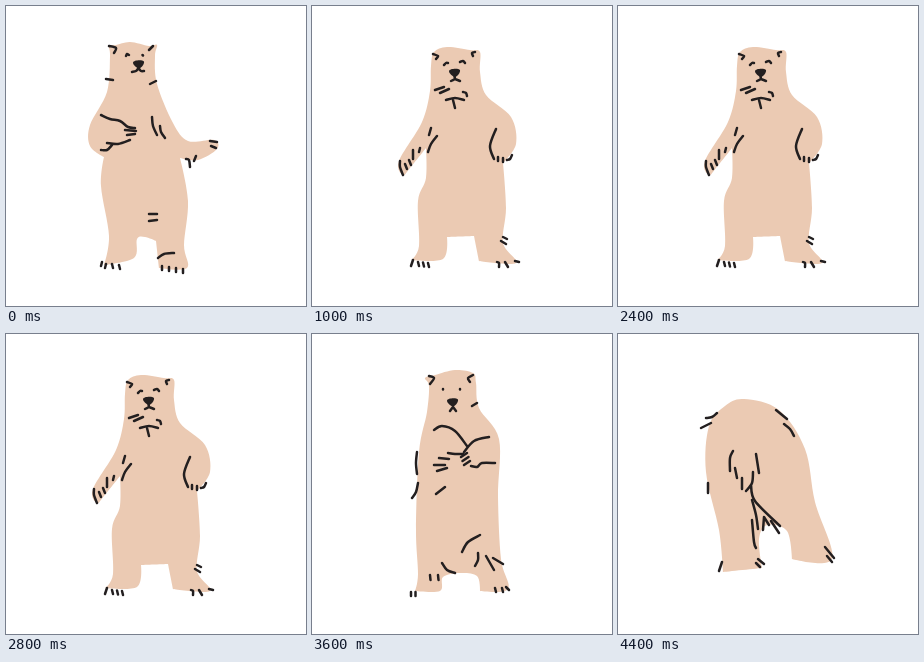
An HTML page that plays this animation: 300 px wide and 300 px high, repeating every 4.6 s.

```html
<!DOCTYPE html>
<html lang="en">
<head>
<meta charset="utf-8">
<title>Dancing bear</title>
<style>
html, body { margin: 0; width: 100%; height: 100%; overflow: hidden; background: #fff; }
svg { display: block; width: 100%; height: 100%; }
.body { fill: #ebcab3; }
.ink { fill: none; stroke: #231f20; stroke-width: 2.5; stroke-linecap: round; stroke-linejoin: round; }
.nose { fill: #231f20; }
</style>
</head>
<body>
<svg id="stage" viewBox="0 0 300 300"></svg>
<script>
const stage = document.getElementById('stage');
let layer;

function add(parent, tag, attributes) {
  const node = document.createElementNS('http://www.w3.org/2000/svg', tag);
  for (const key in attributes) node.setAttribute(key, attributes[key]);
  return parent.appendChild(node);
}

// Smooth curve through "x,y" points; "!" marks a corner.
function spline(text, closed) {
  const words = text.split(' ');
  const points = words.map(word => word.replace('!', '').split(',').map(Number));
  const n = points.length;
  const at = i => points[closed ? (i + n) % n : Math.max(0, Math.min(n - 1, i))];
  const slope = (i, k) => words[(i + n) % n].endsWith('!') ? 0 : (at(i + 1)[k] - at(i - 1)[k]) / 6;
  let d = 'M' + points[0];
  for (let i = 0; i < n - !closed; i++) {
    const out = at(i).map((v, k) => v + slope(i, k));
    const into = at(i + 1).map((v, k) => v - slope(i + 1, k));
    d += `C${out} ${into} ${at(i + 1)}`;
  }
  return d + (closed ? 'Z' : '');
}

const body = points => add(layer, 'path', { class: 'body', d: spline(points, true) });
const ink = strokes => add(layer, 'path', { class: 'ink', d: strokes.split('|').map(s => spline(s)).join('') });
const nose = (x, y) => add(layer, 'path', {
  class: 'nose', transform: `translate(${x} ${y})`,
  d: 'M-5.5-1.5C-5-4 4-4.5 5.5-2.5C6 0 3 4 .5 4.5C-2 4-5.5 1-5.5-1.5Z'
});
function claws(count, x, y, stepX, stepY, dx = 1, dy = 4) {
  for (let i = 0; i < count; i++) {
    const px = x + i * stepX, py = y + i * stepY;
    ink(`${px},${py} ${px + dx},${py + dy}`);
  }
}

const poses = {
  armOut() {
    body('103,40 110,39 124,36 143,40 151,39 149,50 151,78 167,117 182,135 208,134 211,143 192,154 174,152! 182,195 178,239 181,262 153,262! 150,235! 139,231 131,233 128,252 98,259! 103,230 95,180 98,151! 84,140 84,119 101,86 104,50');
    nose(132.5, 58);
    ink('103,40 110,42 108,47|147,40 143,44|120,50 121,48 123,49|136.5,49 137,49.5');
    ink('126,66 130,65 132.5,62! 135,65 138,65|100,73 107,74|144,78 150,75');
    ink('95,109 104,113 114,115 122,121 129,122|119,124 130,125|121,129 129,128|95,144 101,144 106,139|101,137 112,138 124,134');
    ink('146,111 147,120 151,129|154,120 155,126 159,132|204,135 211,136|205,140 210,142');
    ink('180,153 183,154 184,161|190,150 188,155|143,208 151,208|143,215 151,214|152,252 158,248 168,247');
    claws(2, 96, 256, 4, 2, -1);
    claws(2, 106, 258, 7, 1);
    claws(4, 156, 260, 7, 1, 0);
  },
  forward() {
    body('122,46 135,41 158,44 168,46 168,66 174,89 199,111 204,138 191,157! 194,202 191,237 204,257 167,255! 162,230! 135,231! 131,253 99,254! 107,240 106,195 114,172 114,142! 98,162 91,169 87,155 110,116 118,85 119,60');
    nose(142.5, 66.5);
    ink('121,48 126,50 124,53|163,46 160,47 161,50|132,59 134,57 136,57|148,56 151,55 153,57');
    ink('142.5,70 143,73! 139,75|143,73 148,75|123,84 132,81|128,87 137,83|134,94 143,92 152,94|141,94 143,102|151,86 154,87 155,90');
    ink('116,146 119,138 125,130|119,122 117,129|88,155 88,161 91,169|101,144 101,153|108,142 107,146');
    claws(2, 93, 158, 4, -4, 2, 5);
    ink('184,123 178,140 182,153|200,149 198,153 195,154');
    claws(2, 186, 151, 5, 1, 0);
    ink('191,231 195,233|189,235 194,238|101,254 99,260|203,255 207,256');
    claws(3, 106, 256, 5, .5);
    ink('185,256 187,257 187,261|193,256 196,261');
  },
  wave() {
    body('131,42 142,40 160,37 176,37 184,45 189,76 208,113 217,155 204,196 200,239 200,262 174,262! 172,238 153,226! 155,254 130,257! 131,240 115,192 131,146! 107,128 87,106 98,97 115,106 132,101 136,85 134,59');
    nose(159, 58.5);
    ink('135,43 138,45 136,49|177,39 174,41 176,44|147,52 148,50 150,49.5|164,50 168,50');
    ink('151,68 156,67 159,63! 162,66 165,66|134,82 141,86 150,87|178,77 185,72|178,83 184,80 189,75');
    claws(3, 83, 105, 4, -5, 2.5, 4);
    ink('97,95 100,98|98,114 103,110 107,104|121,144 130,138|127,146 134,140 138,132|146,125 143,136');
    ink('185,139 190,132 202,131|184,148 191,145 194,141|191,151 187,157|188,166 185,170 186,175');
    claws(3, 192, 172, 5, 2.5, 1.5, 5);
    claws(2, 212, 158, -3, 7, 2.5);
    ink('165,233 170,229|168,238 174,233|126,263 130,265');
    claws(3, 131, 260, 5, -2, 4, 2);
    claws(4, 176, 262, 7, 0, 0);
  },
  folded() {
    body('113,44 123,41 143,36 161,39 164,49 167,74 187,105 186,163 189,225 196,255 168,257! 165,242 148,239 131,243 128,257 103,257! 106,240 104,195 107,118 115,78 117,52');
    nose(140.5, 68);
    ink('117,42 122,44 118,50|161,41 156,44 158,48|131,55 131,55.5|148,55 148,55.5');
    ink('138,77 141,73! 144,77|160,72 165,69');
    ink('122,96 130,92 143,97 155,112|152,118 162,107 177,103|136,119 143,120 151,120|127,124 137,125|122,131 133,131|125,137 135,134');
    claws(3, 149, 123, 1.5, 4, 6, -4);
    ink('159,132 165,133 170,129 183,129|105,118 104,129 105,140|106,149 104,158 100,164|124,160 133,153');
    ink('150,218 156,208 168,201|166,219 166,226 163,232|174,222 182,236|181,224 191,230|130,229 135,236 143,239');
    claws(2, 118, 241, 8, 0, .5, 5);
    claws(2, 99, 258, 4.5, 0, 0);
    claws(2, 183, 254, 7, 0);
    ink('194,253 197,256');
  },
  bowed() {
    body('126,65 161,76 187,115 197,168 214,225 174,225! 169,197 149,191 141,205 144,234! 105,238! 101,196 88,138 91,92 107,72');
    ink('88,84 94,83 99,79|83,94 93,89|158,76 169,85|166,90 172,95 176,102|90,149 90,159');
    ink('115,117 112,124 112,137|117,134 119,144|124,144 124,155|138,120 141,139|135,138 134,149 128,157|133,151 137,167 162,192');
    ink('134,166 138,181 140,195|134,186 136,208 138,214|146,183 145,196|146,183 151,191|153,187 161,199');
    ink('104,228 101,237|140,225 146,230|138,229 142,233|207,213 216,224|209,222 214,228');
  }
};

function makeLayer(draw, move = '') {
  layer = add(stage, 'g', { transform: move, visibility: 'hidden' });
  draw();
  return layer;
}

const layers = {
  A: makeLayer(poses.armOut),
  B: makeLayer(poses.forward),
  C: makeLayer(poses.wave),
  D: makeLayer(poses.folded),
  E: makeLayer(poses.bowed),
  a: makeLayer(poses.armOut, 'translate(294 -4) scale(-1 1)'),
  b: makeLayer(poses.forward, 'translate(295 -5) scale(-1 1.02)'),
  c: makeLayer(poses.wave, 'translate(302 0) scale(-1 1)'),
  f: makeLayer(poses.armOut, 'translate(296 0) scale(-1 1)'),
  e: makeLayer(poses.bowed, 'translate(299 0) scale(-1 1)')
};

const dance = 'ABABaBAcCcBbBbBbDfDeEeE';
const beat = 200;
let shown;

function render() {
  const next = layers[dance[Math.floor(performance.now() / beat) % dance.length]];
  if (next !== shown) {
    shown?.setAttribute('visibility', 'hidden');
    next.setAttribute('visibility', 'visible');
    shown = next;
  }
  requestAnimationFrame(render);
}
render();
</script>
</body>
</html>
```
